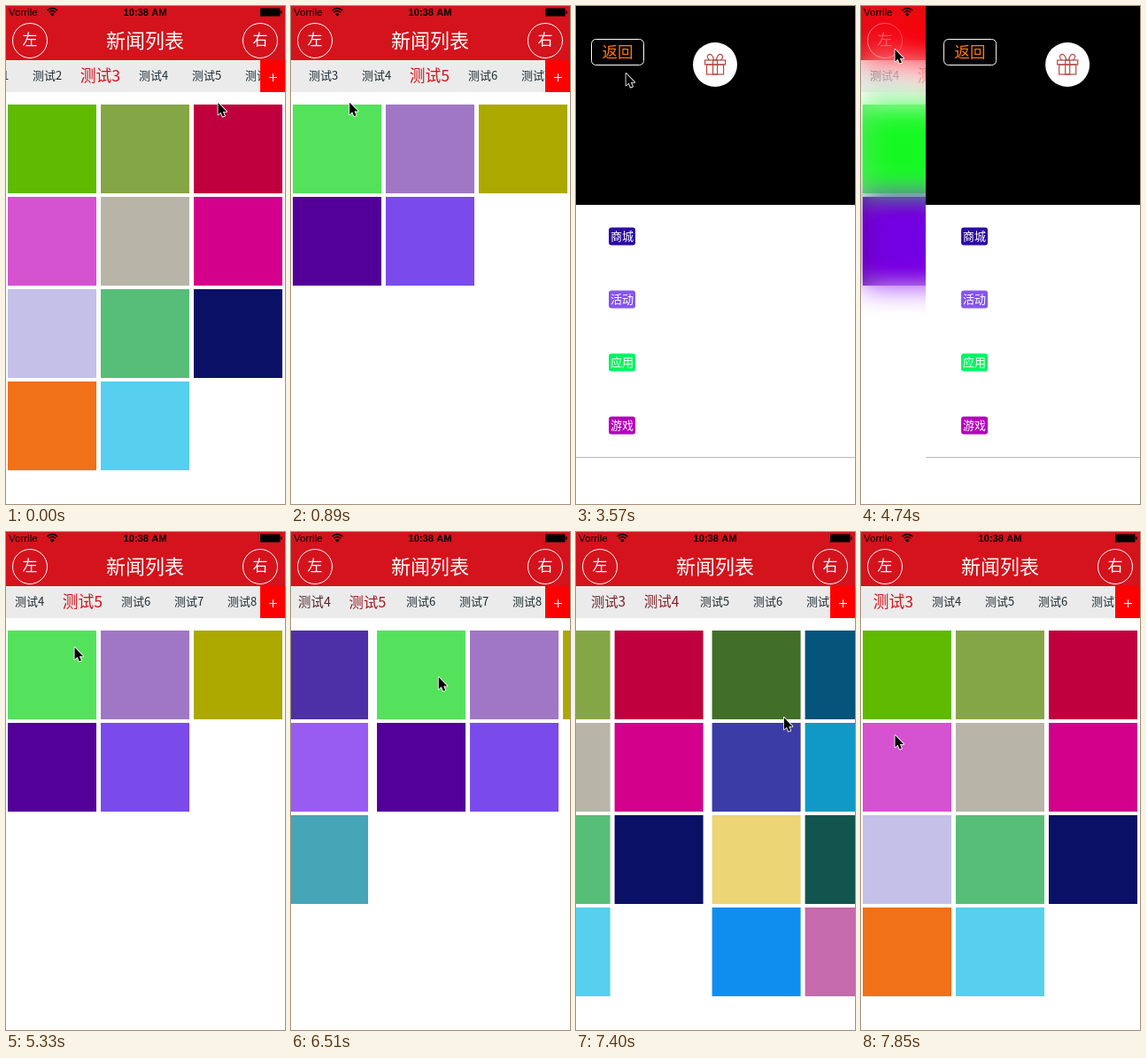
Write an HTML page with a canvas that moves like this. It is 315 px wide and 561 px high and loops after 8 s.

```html
<!DOCTYPE html>
<html lang="zh-CN">
<head>
<meta charset="utf-8">
<title>新闻列表</title>
<style>
html, body { margin: 0; width: 100%; height: 100%; overflow: hidden; background: #fff; }
canvas { display: block; width: 315px; height: 561px; }
</style>
</head>
<body>
<canvas id="stage"></canvas>
<script>
const W = 315, H = 561, LOOP = 8000, STEP = 148, PAGE_W = 320;
const CJK = '"Noto Sans CJK SC", "Noto Sans CJK", sans-serif';
const LATIN = '"Liberation Sans", sans-serif';
const RED = '#d4131c';
const ratio = window.devicePixelRatio || 1;

const pages = {
  3: '5fba00 85a646 c0003e d552d0 b8b5a8 d2008a c4c0e8 57be77 0a1066 f07118 56d0ee',
  4: '416f27 05547c 4d30a7 3c3ca6 1099c6 995cf3 ebd575 12554f 47a5b8 108ef0 c56aaa',
  5: '54e25c a077c4 aca800 520098 7a4bea'
};
const menu = [['商城', '#2c0ba5'], ['活动', '#8656ec'], ['应用', '#00f464'], ['游戏', '#b400bd']];

const swipes = [
  { start: 100, length: 360, step: 1 },
  { start: 490, length: 360, step: 1 },
  { start: 6252, length: 720, step: -1 },
  { start: 7014, length: 800, step: -1 }
];

// Pointer stops: time, x, y.
const stops = [
  [100, 239, 108], [460, 70, 110], [600, 230, 105], [850, 60, 108], [1190, 222, 98],
  [1490, 294, 70], [1780, 281, 43], [2100, 281, 43], [3120, 169, 60], [3552, 56, 75],
  [4290, 38, 48], [4740, 38, 48], [5328, 77, 129], [5620, 95, 46], [5920, 95, 46],
  [6220, 66, 159], [6750, 240, 165], [7014, 85, 207], [7450, 240, 208], [7844, 38, 228]
];

// Eased progress from 0 to 1.
function ease(t, start, length) {
  const u = Math.min(1, Math.max(0, (t - start) / length));
  return u * u * (3 - 2 * u);
}

const sum = (list, fn) => list.reduce((total, item) => total + fn(item), 0);

const pageAt = t => 3 + sum(swipes, s => s.step * ease(t, s.start, s.length));

// The tab strip follows once a swipe has settled.
const scrollAt = t =>
  73.5 + 70 * sum(swipes, s => s.step * ease(t, s.start + s.length + 40, 300));

const drawerAt = t => W * (1 - ease(t, 1965, 300) + ease(t, 4640, 300));

function pointerAt(t) {
  let [, x, y] = stops[0];
  for (let i = 1; i < stops.length; i++) {
    const [t0, x0, y0] = stops[i - 1], [t1, x1, y1] = stops[i];
    const u = ease(t, t0, t1 - t0);
    x += (x1 - x0) * u;
    y += (y1 - y0) * u;
  }
  return [x, y];
}

function setup(canvas) {
  canvas.width = Math.round(W * ratio);
  canvas.height = Math.round(H * ratio);
  const c = canvas.getContext('2d');
  c.scale(ratio, ratio);
  return c;
}
const ctx = setup(document.getElementById('stage'));
const mainCanvas = document.createElement('canvas');
const mainCtx = setup(mainCanvas);

function rect(c, x, y, w, h, color) {
  c.fillStyle = color;
  c.fillRect(x, y, w, h);
}

function text(c, str, x, y, size, color, { align = 'center', weight = 400, family = CJK } = {}) {
  c.font = `${weight} ${size}px ${family}`;
  c.textAlign = align;
  c.textBaseline = 'middle';
  c.fillStyle = color;
  c.fillText(str, x, y);
}

function roundButton(c, label, x) {
  c.beginPath();
  c.arc(x, 39, 19.5, 0, Math.PI * 2);
  c.strokeStyle = '#fff';
  c.lineWidth = 1;
  c.stroke();
  text(c, label, x, 38, 17, '#fff', { weight: 300 });
}

function drawTiles(c, page) {
  for (const [index, colors] of Object.entries(pages)) {
    const left = (index - page) * PAGE_W;
    if (Math.abs(left) >= PAGE_W) continue;
    colors.split(' ').forEach((color, i) => {
      rect(c, left + 2 + (i % 3) * 105, 111 + Math.floor(i / 3) * 104, 100, 100, '#' + color);
    });
  }
}

function drawTabs(c, page, scroll) {
  rect(c, 0, 61, W, 36, '#ebebeb');
  for (let k = 1; k <= 9; k++) {
    const on = Math.max(0, 1 - Math.abs(k - page));
    const mix = (a, b) => Math.round(a + (b - a) * on);
    const color = `rgb(${mix(30, 212)}, ${mix(44, 19)}, ${mix(52, 28)})`;
    text(c, '测试' + k, 60 * k - scroll, 78.5, 13 + 4.8 * on, color);
  }
  rect(c, 287, 61, 28, 36, '#f00');
  rect(c, 297, 80, 9, 1, '#fff');
  rect(c, 301, 76, 1, 9, '#fff');
}

function drawMain(c, page, scroll) {
  rect(c, 0, 0, W, H, '#fff');
  drawTiles(c, page);
  rect(c, 0, 0, W, 61, RED);
  text(c, '新闻列表', 157, 38.7, 22, '#fff');
  roundButton(c, '左', 27);
  roundButton(c, '右', 287);
  drawTabs(c, page, scroll);
}

function drawFrost(amount) {
  ctx.save();
  ctx.globalAlpha = amount;
  ctx.filter = `blur(${16 * ratio}px) saturate(1.8)`;
  ctx.drawImage(mainCanvas, 0, 0, W, H);
  ctx.restore();
}

function drawGift(c) {
  c.beginPath();
  c.arc(157, 66, 25, 0, Math.PI * 2);
  c.fillStyle = '#fff';
  c.fill();
  c.strokeStyle = '#b5483f';
  c.lineWidth = 1.2;
  c.strokeRect(145.6, 61, 23, 5);
  c.strokeRect(147.6, 66, 19, 11);
  c.strokeRect(154.6, 61, 5, 16);
  for (const side of [-1, 1]) {
    c.beginPath();
    c.moveTo(157 + side * 1.5, 61);
    c.bezierCurveTo(157 + side * 2, 56, 157 + side * 5, 53, 157 + side * 7.5, 55);
    c.bezierCurveTo(157 + side * 10, 57, 157 + side * 8, 60, 157 + side * 6, 61);
    c.stroke();
  }
}

function drawDrawer(c, x) {
  c.save();
  c.translate(x, 0);
  rect(c, -3, 0, W + 3, 224, '#000');
  rect(c, -3, 224, W + 3, H - 224, '#fff');
  rect(c, -3, 508, W + 3, 1, '#bbb');
  c.strokeStyle = '#fff';
  c.lineWidth = 1;
  c.beginPath();
  c.roundRect(17.5, 37.5, 59, 29, 5);
  c.stroke();
  text(c, '返回', 47, 51.5, 17.5, '#ff7a10', { weight: 300 });
  drawGift(c);
  menu.forEach(([label, color], i) => {
    const y = 249.5 + 71 * i;
    c.beginPath();
    c.roundRect(37, y, 30, 20, 3);
    c.fillStyle = color;
    c.fill();
    text(c, label, 52, y + 9.7, 13, '#fff', { weight: 300 });
  });
  c.restore();
}

function drawStatus(c) {
  text(c, 'Vorrile', 3, 7.5, 11.5, '#000', { align: 'left', family: LATIN });
  text(c, '10:38 AM', 157, 7.5, 11.2, '#000', { weight: 700, family: LATIN });
  c.strokeStyle = '#000';
  c.lineWidth = 1.7;
  for (const r of [8.3, 5.3]) {
    c.beginPath();
    c.arc(52.3, 11, r, -Math.PI * 0.75, -Math.PI * 0.25);
    c.stroke();
  }
  c.beginPath();
  c.moveTo(52.3, 11.5);
  c.arc(52.3, 11.5, 3.2, -Math.PI * 0.75, -Math.PI * 0.25);
  c.fillStyle = '#000';
  c.fill();
  rect(c, 287, 2.5, 22.5, 9, '#000');
  rect(c, 310.2, 5.3, 1.4, 3.4, '#000');
}

function drawCursor(c, x, y) {
  c.save();
  c.translate(x + 0.5, y + 1);
  c.scale(0.93, 0.93);
  c.beginPath();
  c.lineTo(0, 0);
  c.lineTo(0, 14.5);
  c.lineTo(3.3, 11.5);
  c.lineTo(5.5, 16.8);
  c.lineTo(8, 15.8);
  c.lineTo(5.8, 10.7);
  c.lineTo(10.3, 10.7);
  c.closePath();
  c.lineJoin = 'round';
  c.strokeStyle = '#fff';
  c.lineWidth = 1.8;
  c.stroke();
  c.fillStyle = '#000';
  c.fill();
  c.restore();
}

function draw(t) {
  const drawer = drawerAt(t);
  drawMain(mainCtx, pageAt(t), scrollAt(t));
  ctx.drawImage(mainCanvas, 0, 0, W, H);
  if (drawer < W) {
    drawFrost(1 - drawer / W);
    drawDrawer(ctx, drawer);
  }
  drawStatus(ctx);
  drawCursor(ctx, ...pointerAt(t));
}

// The picture advances in even steps rather than continuously.
function loop() {
  const step = Math.floor((performance.now() % LOOP + 4) / STEP);
  draw(Math.min(step, 53) * STEP);
  requestAnimationFrame(loop);
}
loop();
</script>
</body>
</html>
```
